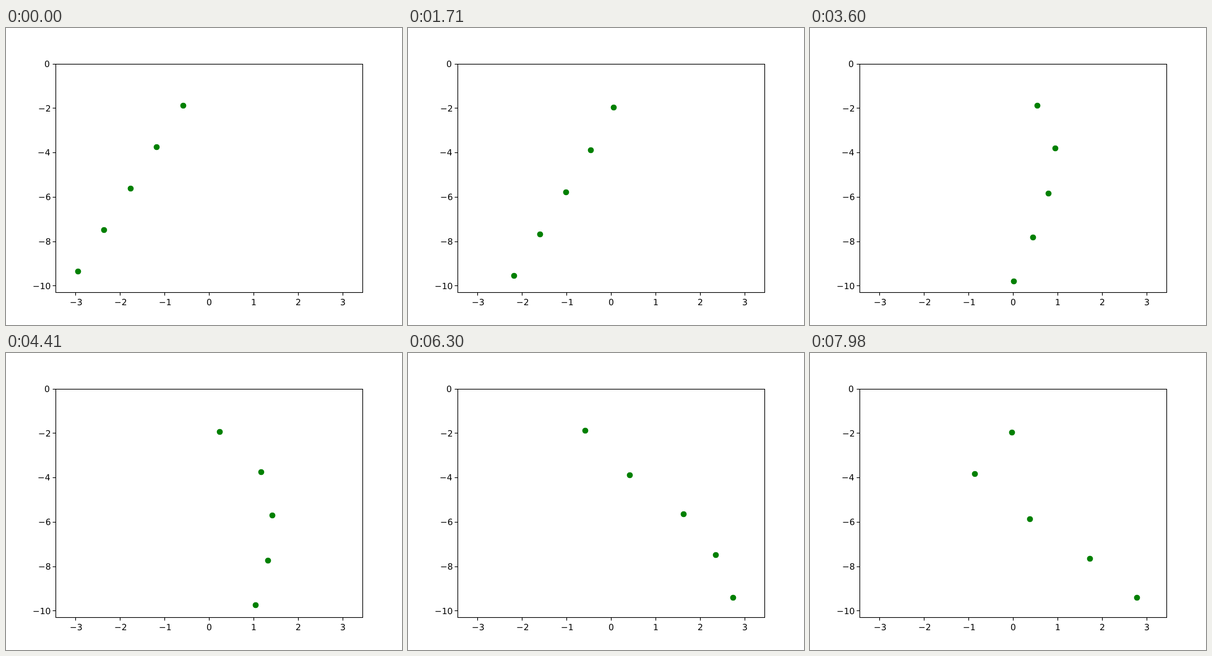
An HTML page with a canvas for the animation above (8000 ms loop, 640 by 480 pixels).

```html
<!DOCTYPE html>
<html>
<head>
<meta charset="utf-8">
<title>Five pendulums</title>
<style>
  html, body { margin: 0; width: 100%; height: 100%; overflow: hidden; background: #fff; }
  canvas { display: block; }
</style>
</head>
<body>
<canvas id="stage" width="640" height="480"></canvas>
<script>
const ctx = document.getElementById('stage').getContext('2d');

// Pendulum model: lengths are fifths of the longest one
const G = 9.8, LONGEST = 9.8, COUNT = 5;
const SWING = 17.5 * Math.PI / 180;
const LOOP = 8000, STEP = 30, SIM_STEP = 0.01312;

// Plot area in pixels, with a margin of 0.5 units around the motion
const LEFT = 80, RIGHT = 576, TOP = 57.6, BOTTOM = 427.2;
const PT = 100 / 72;
const MARGIN = 0.5;
const xScale = (RIGHT - LEFT) / 2 / (LONGEST * Math.sin(SWING) + MARGIN);
const yScale = (BOTTOM - TOP) / (LONGEST + MARGIN);
const toX = x => (LEFT + RIGHT) / 2 + x * xScale;
const toY = y => TOP - y * yScale;
const snap = v => Math.round(v) + 0.5;

function line(x1, y1, x2, y2) {
  ctx.beginPath();
  ctx.moveTo(x1, y1);
  ctx.lineTo(x2, y2);
  ctx.stroke();
}

// align: 0.5 centres the ink on x, 1 ends it there
function label(value, x, baseline, align) {
  const text = String(value).replace('-', '\u2212');
  const box = ctx.measureText(text);
  const ink = box.actualBoundingBoxLeft + box.actualBoundingBoxRight;
  const bearing = -box.actualBoundingBoxLeft;
  ctx.fillText(text, Math.round(x - ink * align + bearing) - bearing, Math.round(baseline));
}

function drawAxes() {
  ctx.strokeStyle = ctx.fillStyle = '#000';
  ctx.lineWidth = 0.8 * PT;
  ctx.font = `${10 * PT}px "DejaVu Sans", sans-serif`;
  ctx.textRendering = 'geometricPrecision';
  const left = snap(LEFT), bottom = snap(BOTTOM), top = snap(TOP);
  ctx.strokeRect(left, top, snap(RIGHT) - left, bottom - top);
  for (let v = -3; v <= 3; v++) {
    line(snap(toX(v)), bottom, snap(toX(v)), bottom + 5);
    label(v, toX(v), BOTTOM + 7 * PT + 11, 0.5);
  }
  for (let v = 0; v >= -10; v -= 2) {
    line(left - 5, snap(toY(v)), left, snap(toY(v)));
    label(v, LEFT - 7 * PT, toY(v) + 5.3, 1);
  }
}

function drawBobs(time) {
  ctx.fillStyle = '#008000';
  for (let k = 1; k <= COUNT; k++) {
    const length = LONGEST * k / COUNT;
    const angle = -SWING * Math.cos(Math.sqrt(G / length) * time);
    const x = toX(length * Math.sin(angle)), y = toY(-length * Math.cos(angle));
    ctx.beginPath();
    ctx.arc(snap(x), snap(y), 3.5 * PT, 0, 2 * Math.PI);
    ctx.fill();
  }
}

function draw() {
  const step = Math.floor(performance.now() % LOOP / STEP);
  ctx.fillStyle = '#fff';
  ctx.fillRect(0, 0, 640, 480);
  drawBobs(step * SIM_STEP);
  drawAxes();
  requestAnimationFrame(draw);
}
draw();
</script>
</body>
</html>
```
